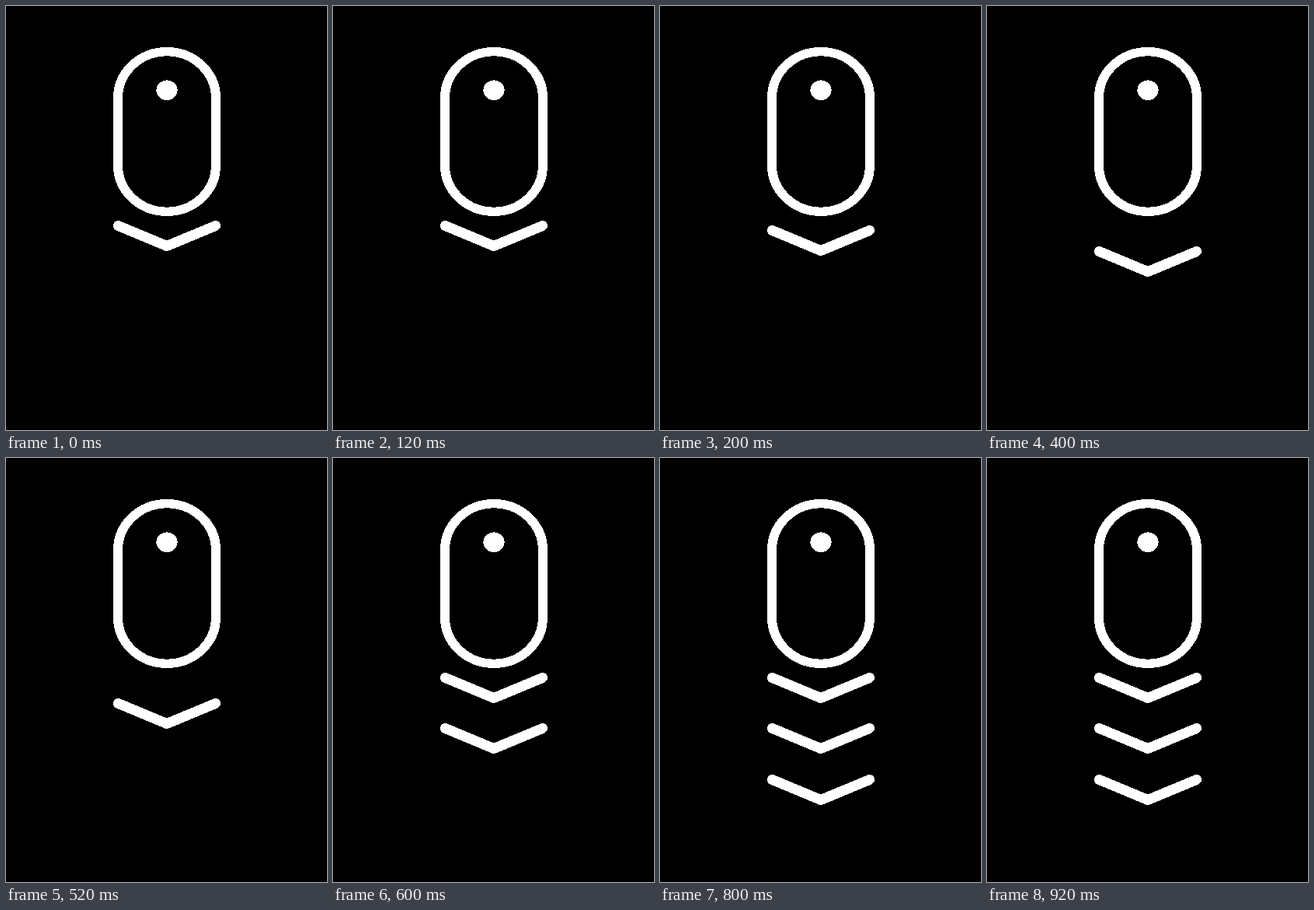
Animation, 413 px wide and 545 px high, one loop 1000 ms. Source, as an HTML page:

```html
<!DOCTYPE html>
<html lang="en">
<head>
<meta charset="utf-8">
<title>Scroll down</title>
<style>
  html, body { margin: 0; width: 100%; height: 100%; overflow: hidden; background: #000; }
  svg { display: block; width: 413px; height: 545px; shape-rendering: crispEdges; }
  .line { fill: none; stroke: #fff; stroke-width: 12; stroke-linecap: round; stroke-linejoin: round; }
  #chevron { stroke-width: 13; }
</style>
</head>
<body>
<svg viewBox="0 0 413 545">
  <defs>
    <path id="chevron" class="line" d="M144.5 282.5 L207 308.5 L269.5 282.5"/>
  </defs>
  <g transform="translate(207 161.5) scale(1 .945)">
    <rect class="line" x="-63" y="-108.8" width="126" height="217.6" rx="63"/>
    <circle cy="-56.3" r="13.6" fill="#fff"/>
  </g>
  <g class="arrow"><use href="#chevron"/></g>
  <g class="arrow"><use href="#chevron"/></g>
  <g class="arrow"><use href="#chevron"/></g>
</svg>
<script>
  const LOOP = 1000;
  // Vertical offset of each arrow per step; null hides it.
  const steps = [
    [0, 6, 33, 0, 0],
    [null, null, null, 65, 65],
    [null, null, null, null, 131]
  ];

  const pose = y => ({
    transform: `translateY(${y ?? 0}px)`,
    opacity: y === null ? 0 : 1
  });

  document.querySelectorAll('.arrow').forEach((el, i) => {
    const row = steps[i];
    const frames = row.map((y, k) => ({ ...pose(y), offset: k / row.length, easing: 'step-end' }));
    frames.push({ ...pose(row[row.length - 1]), offset: 1 });
    el.animate(frames, { duration: LOOP, iterations: Infinity });
  });
</script>
</body>
</html>
```
